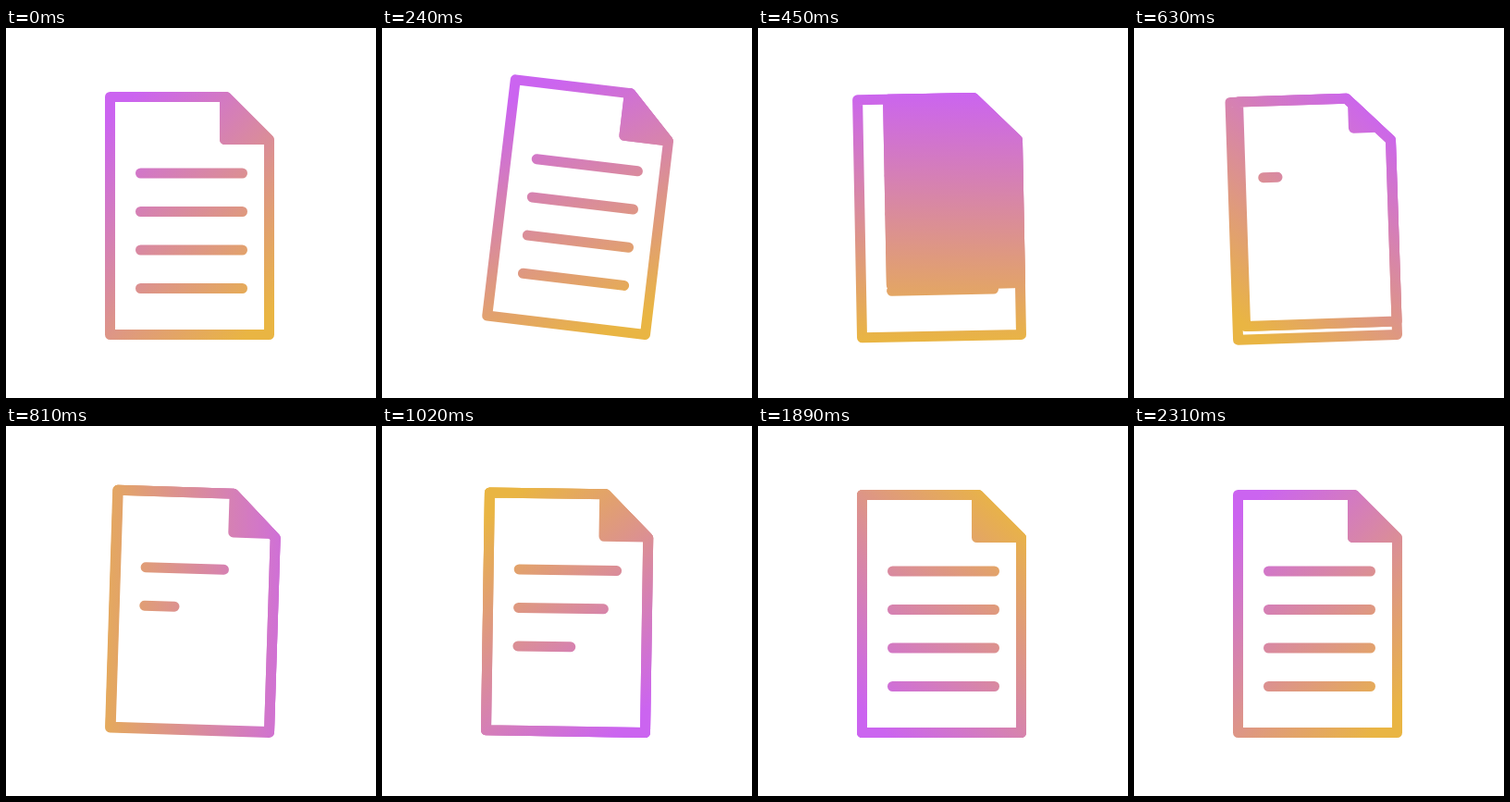
Recreate the animation shown at these times as an HTML page. Size 400 by 400 pixels, loop 3.4 s.

```html
<!DOCTYPE html>
<html lang="en">
<head>
<meta charset="utf-8">
<title>Page turn</title>
<style>
  html, body { margin: 0; width: 100%; height: 100%; overflow: hidden; background: #fff; }
  svg { display: block; width: 100vw; height: 100vh; }
  .ink { stroke: url(#tint); stroke-width: 11; stroke-linecap: round; stroke-linejoin: round; fill: none; }
  .solid { fill: url(#tint); }
</style>
</head>
<body>
<svg viewBox="0 0 400 400">
  <defs>
    <linearGradient id="tint" gradientUnits="userSpaceOnUse" x1="63.5" y1="203" x2="333.5" y2="203">
      <stop offset="0" stop-color="#cb64f0"/>
      <stop offset="1" stop-color="#e9b543"/>
    </linearGradient>
  </defs>
  <g id="doc">
    <g id="oldLines"></g>
    <path id="turn" class="ink solid"/>
    <path id="blank" fill="#fff"/>
    <path id="turnEdge" class="ink"/>
    <g id="newLines"></g>
    <path id="fold" class="ink solid"/>
    <path class="ink" d="M112.5 74.5H238L284.5 121V331.5H112.5Z"/>
  </g>
</svg>
<script>
const LOOP = 3400, RESET = 2100;
const SPIN_END = 1640;
const GROW = 600;
const TURN_AT = 280, FOLD_AT = 545, LINES_AT = 620, LINE_GAP = 160;
const ROWS = [157, 198.5, 240, 281.5];
const LEFT = 145.5, LENGTH = 110;
const SWING = [[0, 0], [250, 6.85], [533, -3], [850, 2], [1167, 0]];

// Positions of the folded corner along its path
const BUD = [254.5, 91], REST = [236.5, 120.5], FLAT = [112.5, 331.5];

const $ = id => document.getElementById(id);
const clamp = x => Math.min(1, Math.max(0, x));
const mix = (a, b, p) => a + (b - a) * p;
const sine = p => (1 - Math.cos(Math.PI * clamp(p))) / 2;
const cubic = (a, b, u) => 3 * a * u * (1 - u) ** 2 + 3 * b * u * u * (1 - u) + u ** 3;

// Fast start, long settle: cubic-bezier(.04, .4, .2, 1)
function settle(p) {
  if (p <= 0) return 0;
  if (p >= 1) return 1;
  let lo = 0, hi = 1;
  for (let i = 0; i < 24; i++) {
    const mid = (lo + hi) / 2;
    if (cubic(0.04, 0.2, mid) < p) lo = mid; else hi = mid;
  }
  return cubic(0.4, 1, lo);
}

function swing(t) {
  for (let i = 1; i < SWING.length; i++) {
    const [t0, a] = SWING[i - 1], [t1, b] = SWING[i];
    if (t < t1) return mix(a, b, sine((t - t0) / (t1 - t0)));
  }
  return 0;
}

// Flap between the cut corner of the page and its own corner
function flap(from, to, p) {
  const x = mix(from[0], to[0], p), y = mix(from[1], to[1], p);
  const top = Math.max(74.5, x - 163.5), right = Math.min(284.5, y + 163.5);
  return `M${x} ${top}H${Math.max(x, 238)}L${right} ${Math.min(y, 121)}V${y}H${x}Z`;
}

function addLines(group) {
  return ROWS.map(y => {
    const line = document.createElementNS("http://www.w3.org/2000/svg", "path");
    line.setAttribute("class", "ink");
    line.setAttribute("d", `M${LEFT} ${y}h${LENGTH}`);
    return group.appendChild(line);
  });
}

addLines($("oldLines"));
const typed = addLines($("newLines"));

function render(time) {
  const t = time < RESET ? time : 0;
  $("doc").setAttribute("transform", `rotate(${swing(t)} 284.5 331.5)`);
  $("tint").setAttribute("gradientTransform", `rotate(${45 + 270 * sine(t / SPIN_END)} 198.5 203)`);

  const turned = flap(REST, FLAT, settle((t - TURN_AT) / GROW));
  for (const id of ["turn", "blank", "turnEdge"]) $(id).setAttribute("d", turned);
  $("blank").setAttribute("opacity", clamp((t - 480) / 70));

  $("fold").setAttribute("d", flap(BUD, REST, settle((t - FOLD_AT) / GROW)));
  $("fold").setAttribute("visibility", t > FOLD_AT ? "visible" : "hidden");

  typed.forEach((line, i) => {
    const p = settle((t - LINES_AT - i * LINE_GAP) / GROW);
    line.setAttribute("d", `M${LEFT} ${ROWS[i]}h${LENGTH * p}`);
    line.setAttribute("visibility", p > 0 ? "visible" : "hidden");
  });
}

const start = performance.now();
function tick() {
  render((performance.now() - start) % LOOP);
  requestAnimationFrame(tick);
}
tick();
</script>
</body>
</html>
```
